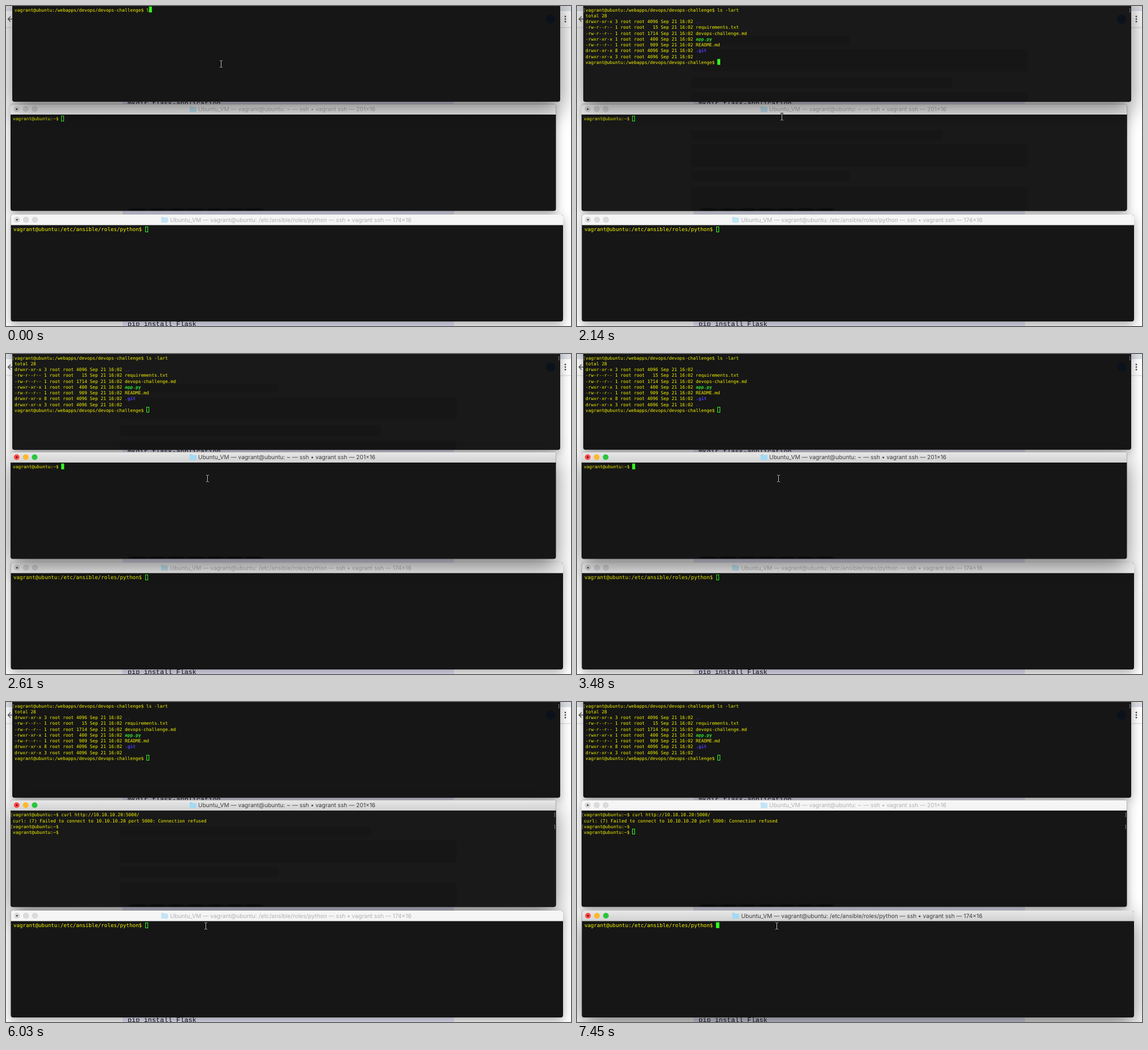
Write an HTML page with a canvas that moves like this. It is 994 px wide and 563 px high and loops after 8 s.

```html
<!DOCTYPE html>
<html lang="en">
<head>
<meta charset="utf-8">
<title>Three terminals</title>
<style>
  html, body { margin: 0; height: 100%; overflow: hidden; background: #fff; }
  canvas { display: block; }
</style>
</head>
<body>
<canvas id="stage" width="994" height="563"></canvas>
<script>
const ctx = document.getElementById('stage').getContext('2d');
const LOOP = 8000;
const YELLOW = '#f4f400', GREEN = '#33ff22', BLUE = '#5140f0';
const MONO = '"DejaVu Sans Mono", monospace';

// Value of the last [time, value] step that has begun.
const at = (t, steps) => steps.reduce((v, [start, next]) => t >= start ? next : v, steps[0][1]);
const between = (t, a, b) => t >= a && t < b;

function rect(x, y, w, h, color, radius = 0) {
  ctx.fillStyle = color;
  ctx.beginPath();
  ctx.roundRect(x, y, w, h, radius);
  ctx.fill();
}

function dot(x, y, rx, color, ry = rx) {
  ctx.fillStyle = color;
  ctx.beginPath();
  ctx.ellipse(x, y, rx, ry, 0, 0, 7);
  ctx.fill();
}

function text(str, x, y, font, color, align = 'left') {
  ctx.font = font;
  ctx.fillStyle = color;
  ctx.textAlign = align;
  ctx.fillText(str, x, y);
}

const PROMPT = {
  top: 'vagrant@ubuntu:/webapps/devops/devops-challenge$ ',
  mid: 'vagrant@ubuntu:~$ ',
  low: 'vagrant@ubuntu:/etc/ansible/roles/python$ '
};
const LISTING = [
  ['total 28', ''],
  ['drwxr-xr-x 3 root root 4096 Sep 21 16:02 ', '..', BLUE],
  ['-rw-r--r-- 1 root root   15 Sep 21 16:02 ', 'requirements.txt'],
  ['-rw-r--r-- 1 root root 1714 Sep 21 16:02 ', 'devops-challenge.md'],
  ['-rwxr-xr-x 1 root root  400 Sep 21 16:02 ', 'app.py', '#33e033', 'bold '],
  ['-rw-r--r-- 1 root root  909 Sep 21 16:02 ', 'README.md'],
  ['drwxr-xr-x 8 root root 4096 Sep 21 16:02 ', '.git', BLUE, 'bold '],
  ['drwxr-xr-x 3 root root 4096 Sep 21 16:02 ', '.', BLUE]
];

const windows = {
  top: {
    x: 11, y: -18, w: 964, h: 186.5, textX: 15, base: 9.7, size: 7.865,
    ghosts: [[52, 16, 280], [76, 39, 593], [125, 20, 460], [152, 16, 593]],
    ghostly: t => between(t, 1100, 3030),
    lines(t) {
      const typed = at(t, [[0, 'l'], [150, 'ls'], [370, 'ls -'], [580, 'ls -la'], [800, 'ls -lart']]);
      const first = [PROMPT.top + typed, ''];
      return t < 1100 ? [first] : [first, ...LISTING, [PROMPT.top, '']];
    },
    brackets: t => t < 1100 ? [] : [0]
  },
  mid: {
    x: 8, y: 172.5, w: 959.5, h: 188, textX: 12, base: 201.3, size: 7.865, titleX: 494, iconX: 323,
    title: 'Ubuntu_VM — vagrant@ubuntu: ~ — ssh • vagrant ssh — 201×16',
    ghosts: [[218, 19, 443], [243, 40, 593], [290, 18, 280], [318, 41, 593]],
    ghostly: t => between(t, 1990, 2610) || between(t, 5890, 6350),
    lines(t) {
      const typed = at(t, [[0, ''], [3660, 'curl '], [3950, 'curl http://10.10.10.20:5000/']]);
      const lines = [[PROMPT.mid + typed, '']];
      if (t >= 4700) lines.push(
        ['curl: (7) Failed to connect to 10.10.10.20 port 5000: Connection refused', ''],
        [PROMPT.mid, '']);
      if (t >= 5140) lines.push([PROMPT.mid, '']);
      return lines;
    },
    brackets: t => t < 4700 ? [] : t < 5140 ? [0] : [0, 2]
  },
  low: {
    x: 8.5, y: 367, w: 971.5, h: 188, textX: 13, base: 396.2, size: 9.17, titleX: 501, iconX: 273,
    title: 'Ubuntu_VM — vagrant@ubuntu: /etc/ansible/roles/python — ssh • vagrant ssh — 174×16',
    ghosts: [],
    ghostly: () => false,
    lines: () => [[PROMPT.low, '']],
    brackets: () => []
  }
};

const stacking = [[0, ['mid', 'low', 'top']], [2290, ['low', 'top', 'mid']], [5890, ['top', 'mid', 'low']]];
const focus = [[0, 'top'], [2610, 'mid'], [6350, 'low']];
const blink = [[0, true], [1390, false], [1990, true], [3030, false], [3480, true],
  [5590, false], [6350, true], [7000, false], [7450, true]];
const pointer = [[0, [378, 102]], [1540, [378, 107]], [1690, [377, 116]], [1990, [370, 150]],
  [2140, [360, 195]], [2290, [354, 219]], [5440, [354, 226]], [5590, [353, 285]],
  [5740, [352, 360]], [5890, [351, 394]]];

function drawPage() {
  rect(0, 0, 994, 563, '#fff');
  rect(0, 0, 994, 9, '#dde1e7');
  rect(0, 37.5, 994, 1, '#d4d4d8');
  ctx.strokeStyle = '#55585c';
  ctx.lineWidth = 1.4;
  ctx.stroke(new Path2D('M12 23H3.5M8 18.5L3.5 23L8 27.5'));
  for (const y of [18.5, 23, 27.5]) dot(984, y, 1.4, '#505357');
  for (const [y, h] of [[152, 36], [318, 70], [515, 60]]) rect(205, y, 583, h, '#e6e6fa');
  const font = '11.87px "Liberation Mono", monospace';
  text('mkdir flask-application', 214, 174.5, font, '#111');
  text('pip install Flask', 214, 562.5, font, '#111');
}

function drawTitleBar(win, active) {
  const { x, y, w, iconX } = win, cy = y + 9;
  const fill = ctx.createLinearGradient(0, y, 0, y + 18);
  fill.addColorStop(0, active ? '#e8e8e8' : '#f6f6f6');
  fill.addColorStop(1, active ? '#d2d2d2' : '#f4f4f4');
  rect(x, y, w, 18.5, fill, [4, 4, 0, 0]);
  ['#fc4b48', '#fdb82f', '#2ac53c'].forEach((color, i) => {
    const cx = x + 10.8 + i * 15.8;
    if (active) dot(cx, cy, 5, color);
    else {
      dot(cx, cy, 5, '#cbcbcb');
      dot(cx, cy, 4.4, '#dcdcdc');
    }
    if (!i) dot(cx, cy, 1.6, active ? '#6a0505' : '#444');
  });
  rect(iconX, cy - 4.8, 5, 3, active ? '#8ccbea' : '#b4def2', 1);
  rect(iconX, cy - 3.8, 12, 9, active ? '#a2daf3' : '#c2e5f6', 1);
  text(win.title, win.titleX, cy + 3.8, '10.15px Inter, sans-serif', active ? '#3c3c3c' : '#b2b2b2', 'center');
}

function drawWindow(name, t) {
  const win = windows[name], { x, y, w, h, textX, base, size } = win;
  const active = at(t, focus) === name;
  ctx.save();
  ctx.shadowColor = active ? 'rgba(0,0,0,.5)' : 'rgba(0,0,0,.34)';
  ctx.shadowBlur = active ? 38 : 18;
  ctx.shadowOffsetY = active ? 14 : 6;
  rect(x, y, w, h, '#161616', 4);
  ctx.restore();

  if (win.ghostly(t)) {
    rect(x, y + 18, w, h - 18, '#191919', [0, 0, 4, 4]);
    for (const [gy, gh, gw] of win.ghosts) rect(200, gy, gw, gh, '#161616', 6);
  }
  if (name === 'top') dot(958, 23, 8, '#0b121c');
  if (name === 'mid') for (let i = 0; i < 7; i++) dot(232 + i * 34, 358, 17, '#0b0b0b', 2);
  if (win.title) drawTitleBar(win, active);

  const font = `${size}px ${MONO}`;
  ctx.font = font;
  const cell = ctx.measureText('0').width, pitch = 10.24;
  const lines = win.lines(t);
  lines.forEach(([plain, file, color = YELLOW, weight = ''], i) => {
    const ly = base + i * pitch;
    text(plain, textX, ly, font, YELLOW);
    text(file, textX + plain.length * cell, ly, weight + font, color);
  });
  for (const row of win.brackets(t)) {
    text('[', textX - cell, base + row * pitch, font, '#a0a070');
    text(']', x + w - cell, base + row * pitch, font, '#a0a0a0');
  }

  const last = lines.length - 1;
  const cx = textX + lines[last][0].length * cell, cy = base + last * pitch - 8.6;
  if (!active) {
    ctx.strokeStyle = GREEN;
    ctx.lineWidth = 1;
    ctx.strokeRect(Math.round(cx) + .5, Math.round(cy) + .5, 4, 9);
  } else if (at(t, blink)) rect(cx, cy, cell + .4, 10.2, GREEN);
}

function drawPointer([x, y]) {
  const beam = new Path2D('M-2.5 -6Q0 -6 0 -4.5Q0 -6 2.5 -6M0 -5V5M-2.5 6Q0 6 0 4.5Q0 6 2.5 6');
  ctx.save();
  ctx.translate(x + .5, y);
  for (const [color, width] of [['#000', 2.4], ['#d0d0d0', 1]]) {
    ctx.strokeStyle = color;
    ctx.lineWidth = width;
    ctx.stroke(beam);
  }
  ctx.restore();
}

function draw(now) {
  const t = now % LOOP;
  ctx.textRendering = 'geometricPrecision';
  drawPage();
  for (const name of at(t, stacking)) drawWindow(name, t);
  drawPointer(at(t, pointer));
  requestAnimationFrame(draw);
}
requestAnimationFrame(draw);
</script>
</body>
</html>
```
